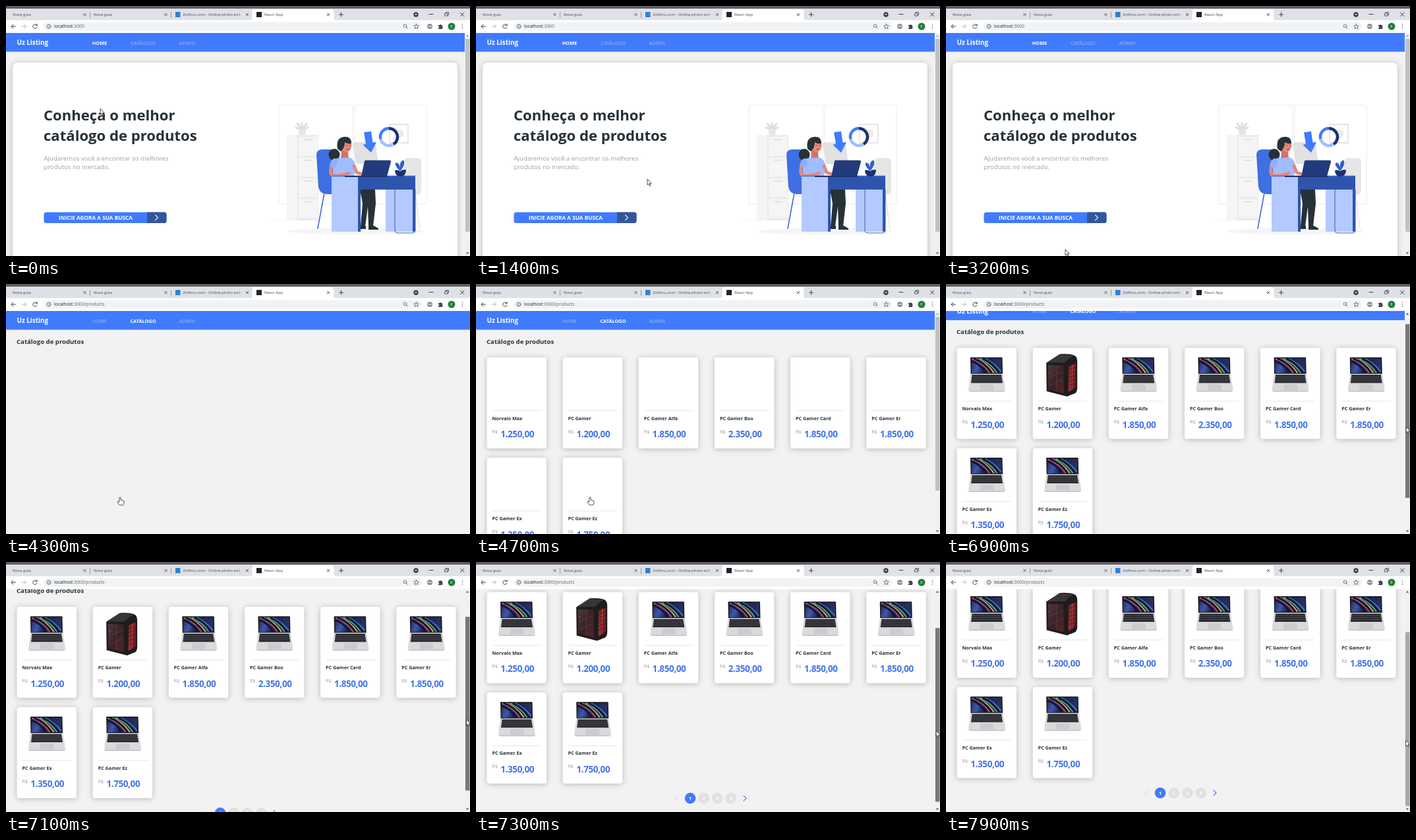
An HTML page that plays this animation: 704 by 380 pixels, repeating every 8000 ms.

```html
<!DOCTYPE html>
<html lang="pt">
<head>
<meta charset="utf-8">
<title>Catálogo</title>
<style>
html, body { margin: 0; width: 100%; height: 100%; overflow: hidden; background: #f2f2f2; }
svg { display: block; width: 704px; height: 380px; font-family: "Open Sans", sans-serif; }
.b { font-weight: 700; }
.mid { text-anchor: middle; }
.nav { font-size: 7.37px; text-anchor: middle; fill: #fff; fill-opacity: .5; }
.nav.on { font-weight: 700; fill-opacity: 1; }
.price { font-size: 13.5px; font-weight: 700; letter-spacing: -.03em; fill: #4474ec; }
.box { fill: #fff; filter: drop-shadow(0 1.5px 4px rgba(0,0,0,.25)); }
.line { fill: none; stroke-linecap: round; stroke-linejoin: round; }
</style>
</head>
<body>
<svg viewBox="0 0 704 380">
<defs>
  <linearGradient id="wallpaper" x1="0" x2="1" y2=".2">
    <stop offset="0" stop-color="#2a2440"/><stop offset=".3" stop-color="#3d58b0"/>
    <stop offset=".55" stop-color="#1d2350"/><stop offset="1" stop-color="#28305e"/>
  </linearGradient>
  <linearGradient id="glass" x2="1" y2="1">
    <stop offset="0" stop-color="#4c3a3d"/><stop offset=".5" stop-color="#3a2225"/><stop offset="1" stop-color="#54262b"/>
  </linearGradient>
  <linearGradient id="glow" x2="1" y2=".3">
    <stop offset="0" stop-color="#5a1c20"/><stop offset=".5" stop-color="#b8383c"/><stop offset="1" stop-color="#6c2226"/>
  </linearGradient>
  <linearGradient id="fade">
    <stop offset="0" stop-color="#dee1e6" stop-opacity="0"/><stop offset="1" stop-color="#dee1e6"/>
  </linearGradient>
  <g id="laptop">
    <path d="M20.500 15.500Q20.500 14.500 21.500 14.500H68Q69 14.500 69 15.500L69.500 40H21Z" fill="#15161b"/>
    <path d="M22 16H67.700L68 38.500H22.300Z" fill="url(#wallpaper)"/>
    <g class="line" style="stroke-linecap:butt" stroke-width="2">
      <path d="M23 17Q39 22 50 38" stroke="#c94f78"/>
      <path d="M29 16.500Q45 22 56 38" stroke="#e2b64b"/>
      <path d="M35 16.500Q51 23 61 38" stroke="#53a884"/>
      <path d="M43 16.500Q58 24 67 36" stroke="#3f78cf"/>
      <path d="M26 16.500Q42 22 53 38M39 16.500Q55 23 64 38M22.500 20Q36 25 44 38" stroke="#14162d" stroke-width="3"/>
    </g>
    <path d="M20.500 39.500H70L73.500 64Q73.500 66.500 71 66.500H20Q17.500 66.500 17.500 64Z" fill="#dadadd"/>
    <path d="M23 41H67.500L69.500 53.500H21.500Z" fill="#2b2c31"/>
    <path d="M23 44H68M22.500 47H68.500M22 50H69" stroke="#6d6f76" stroke-width=".6" stroke-dasharray="2.4 .9"/>
    <path d="M36 55.500H55L56.500 64.500H34.500Z" fill="#cbcbd0"/>
    <path d="M19 66H72" stroke="#a9a9ae" stroke-width=".8"/>
  </g>
  <g id="tower">
    <path d="M20.500 23 41 9.500Q55 8.500 63 11.500Q68 14 67.500 22V62Q67 69 62 70L52 74 21 66Z" fill="#1f1c1e"/>
    <path d="M21 22.500 41 10 63 12Q54 15 49 22.500Z" fill="#383638"/>
    <path d="M23 26 47 27V69L23.500 63Z" fill="url(#glass)"/>
    <path d="M25 45 45 36M25 58 45 48M36 27V66" stroke="#665054" stroke-width=".6"/>
    <circle cx="26" cy="38" r="1.2" fill="#a8343a"/>
    <path d="M54 29Q60 25 65 24V60Q60 64 54 67Z" fill="url(#glow)"/>
    <path d="M54 34 65 29M54 40 65 35M54 46 65 41M54 52 65 47M54 58 65 53M58 27V65M62 25V62" stroke="#47191c" stroke-width=".8"/>
  </g>
  <g id="chevron"><path class="line" d="M-2-4 2 0-2 4" stroke-width="1.1"/></g>
</defs>

<rect width="704" height="380" fill="#f2f2f2"/>

<g id="page">
  <rect y="41" width="704" height="28.500" fill="#407bff"/>
  <text class="b" x="16.500" y="59.200" font-size="9.85" fill="#fff">Uz Listing</text>
  <text id="navHome" class="nav" x="142" y="58.600">HOME</text>
  <text id="navCatalog" class="nav" x="208" y="58.600">CATÁLOGO</text>
  <text class="nav" x="275" y="58.600">ADMIN</text>

  <g id="home">
    <rect class="box" x="10" y="86" width="675" height="330" rx="7"/>
    <g class="b" font-size="22.1" fill="#263238">
      <text x="57" y="174">Conheça o melhor</text>
      <text x="57" y="205">catálogo de produtos</text>
    </g>
    <g font-size="9.6" fill="#9e9e9e">
      <text x="57.500" y="234.700">Ajudaremos você a encontrar os melhores</text>
      <text x="57.500" y="248.200">produtos no mercado.</text>
    </g>
    <rect x="57.500" y="313.500" width="186" height="16.500" rx="3.500" fill="#407bff"/>
    <path d="M214 313.500H240Q243.500 313.500 243.500 317V326.500Q243.500 330 240 330H214Z" fill="#33569b"/>
    <text class="b mid" x="136" y="324.800" font-size="8.25" fill="#fff">INICIE AGORA A SUA BUSCA</text>
    <use href="#chevron" x="228.500" y="321.700" stroke="#fff"/>

    <g id="illustration">
      <ellipse cx="531" cy="342.500" rx="103" ry="5" fill="#f5f5f5"/>
      <g fill="none" stroke="#e6e6e6" stroke-width=".8">
        <path d="M414 301V153Q414 151 416 151H526V301ZM529 301V151H636Q638 151 638 153V301Z"/>
        <path d="M402 326H434" stroke="#f0f0f0"/>
        <path d="M582 180H610V208H582Z" stroke="#dcdcdc" stroke-width="1.3"/>
        <circle cx="597" cy="194" r="6" fill="#ececec"/>
      </g>
      <path d="M426 196H442V326H426Z" fill="#f5f5f5"/>
      <path d="M442 196H474V326H442Z" fill="#ebebeb"/>
      <g id="drawers"></g>
      <path class="line" d="M449 188V178M449 187 442 179M449 187 456 179M446 186 440 185M452 186 458 185" stroke="#dedede" stroke-width="3.200"/>
      <path d="M443 187H456L454 196H445Z" fill="#e6e6e6"/>
      <path d="M604 236Q605 231 611 231H624Q630 231 630 238V281Q629 287 622 287H604Z" fill="#e6e6e6"/>
      <path d="M621 285 628 339M608 285 603 339" stroke="#e0e0e0" stroke-width="1.3"/>
      <path d="M526 211Q526 207 530 207H557Q560 207 561 211L565 240H531Z" fill="#e2e2e2"/>
      <path class="line" d="M483 284 473 338M506 284 516 338" stroke="#3a6be0" stroke-width="1.600"/>
      <path d="M471 225Q472 218 480 218H496Q503 219 505 228L511 279Q511 286 504 286H487Q476 286 474 275Z" fill="#3e6fe3"/>

      <g class="line" stroke-width="4.500" style="stroke-linecap:butt">
        <path d="M581 186A13 13 0 0 1 588 210" stroke="#1c3270"/>
        <path d="M588 210A13 13 0 0 1 568.300 202" stroke="#a0bdff"/>
        <path d="M568.300 202A13 13 0 0 1 581 186" stroke="#407bff"/>
      </g>
      <path d="M543 192 554 190.500 556.500 207.500 562 207 554 223 541.500 211 546 209.500Z" fill="#407bff"/>

      <path d="M537 279H560L561 300 557 335H550L549 305 545 335H538L541 300Z" fill="#263238"/>
      <path d="M538 334H546V339H535ZM550 334H558L565 338V340H550Z" fill="#263238"/>
      <path d="M509 218 519 221 520 233H508Z" fill="#d37466"/>
      <ellipse cx="517" cy="212" rx="7.500" ry="10" fill="#e4897b"/>
      <path d="M503 217Q500 201 512 199Q524 197 524 209Q518 210 514 207Q514 216 508 221Z" fill="#263238"/>
      <ellipse cx="498" cy="226" rx="8.500" ry="9" fill="#263238"/>
      <path class="line" d="M517 211.500V212.500M522 211V212M517 218Q520 219 521 217" stroke="#263238" stroke-width=".8"/>
      <path d="M496 236Q502 230 509 231L521 230Q530 233 531 247L527 260H496Z" fill="#a0bdff"/>
      <path class="line" d="M495 240Q490 253 495 257Q505 260 520 254M528 243 532 253 538 255" stroke="#e4897b" stroke-width="5"/>
      <path d="M493 236Q499 228 503 234L500 246 491 243Z" fill="#8eb0fb"/>

      <path d="M494 259H536V343H494Z" fill="#b3c9ff"/>
      <path d="M576 279H617V343H576Z" fill="#b3c9ff"/>
      <path d="M534 259H621V279H538V343H534ZM617 279H621V343H617Z" fill="#2e54ad"/>
      <path d="M494 258.500H621" stroke="#416fd1" stroke-width="1.300"/>
      <path d="M544 235.500Q544.500 234.500 546 234.500H582Q584.500 234.500 584 237L578 259H539Z" fill="#233b7c"/>
      <path d="M514 258H579V260H514Z" fill="#1c3270"/>
      <path d="M597 250Q588 241 592 238Q596 238 598 245Q597 236 603 234Q607 240 599 250Z" fill="#2e5fd0"/>
      <path d="M590 250Q594 248 598 251Q602 248 607 249Q607 256 602 259H595Q590 256 590 250Z" fill="#1c3270"/>
      <path class="line" d="M590 279V341Q590 345 594 345H617Q621 345 621 341V279" stroke="#2e54ad" stroke-width=".9"/>
    </g>
  </g>

  <g id="catalog">
    <text class="b" x="16" y="90.700" font-size="9.6" fill="#263238">Catálogo de produtos</text>
    <g id="products">
      <g id="cards"></g>
      <g id="pager" class="b mid" font-size="7"></g>
    </g>
  </g>
</g>

<g id="scrollbar">
  <path d="M696 41H704V380H696Z" fill="#f1f1f1"/>
  <path id="upArrow" d="M697.800 46.500 700 44 702.200 46.500Z"/>
  <path d="M697.800 374.500 700 377 702.200 374.500Z" fill="#505050"/>
  <rect id="thumb" x="697" width="6.500"/>
</g>

<g id="browser">
  <path d="M0 0H704V22H0Z" fill="#dee1e6"/>
  <path d="M0 0H704V4H0Z" fill="#625e64"/>
  <path d="M0 21.500H704V41H0Z" fill="#fff"/>
  <path d="M370 22Q373.500 22 373.500 18V8.500Q373.500 5 377 5H494Q497.500 5 497.500 8.500V18Q497.500 22 501 22Z" fill="#fff"/>
  <path d="M127.500 9V18M250.500 9V18" stroke="#85888d" stroke-width=".8"/>
  <g font-size="6" fill="#45484d">
    <text x="10" y="15.200">Nova guia</text>
    <text x="133" y="15.200">Nova guia</text>
    <text x="268.500" y="15.200">Zofimu.com - Online photo edit</text>
    <text x="392" y="15.200">React App</text>
  </g>
  <path d="M348 8H363V18H348Z" fill="url(#fade)"/>
  <rect x="257" y="9" width="7.500" height="8" fill="#2f7fd6"/>
  <rect x="380" y="9" width="8" height="8" fill="#20232a"/>
  <g id="closers" class="line" stroke="#4a4d52" stroke-width=".9"></g>
  <g class="line" stroke="#3c4043" stroke-width="1">
    <path d="M505.500 13H511.500M508.500 10V16M642 12.500H648M689.500 10 695 15.500M695 10 689.500 15.500"/>
    <path d="M666 11H670V15H666ZM667.500 11V9.500H671.500V13.500H670" stroke-width=".8"/>
    <path d="M14.500 31H8M11 28 8 31 11 34"/>
    <path d="M24 31H30.500M27.500 28 30.500 31 27.500 34" stroke="#b8babd"/>
    <path d="M46.500 29A3.200 3.200 0 1 0 47 32.200M47.200 27.500V29.700H45"/>
  </g>
  <circle cx="622" cy="13" r="3.700" fill="#3c4043"/>
  <path d="M620.300 12H623.700L622 14.200Z" fill="#fff"/>
  <rect x="57" y="24.500" width="574" height="13" rx="6.500" fill="#f1f3f4"/>
  <g class="line" stroke="#5f6368" stroke-width=".9">
    <circle cx="65" cy="31" r="3"/><path d="M65 30.800V32.500M65 29.300V29.400"/>
    <circle cx="605.500" cy="30.300" r="2.300"/><path d="M607.300 32.100 609.300 34"/>
    <path d="M622.500 27.300 623.600 29.700 626.300 30 624.300 31.800 624.900 34.400 622.500 33 620.100 34.400 620.700 31.800 618.700 30 621.400 29.700Z"/>
  </g>
  <text x="73" y="33.300" font-size="6.8" fill="#202124">localhost<tspan id="urlTail" fill="#5f6368"></tspan></text>
  <circle cx="643" cy="31" r="4" fill="#8c8f93"/>
  <path d="M640 31H646" stroke="#d5d7da" stroke-width="1.500"/>
  <path d="M656 29H658A1.300 1.300 0 0 1 660.500 29H662V31.200A1.300 1.300 0 0 1 662 33.600V35H656V33.500A1.200 1.200 0 0 0 656 31Z" fill="#46494d"/>
  <circle cx="676" cy="31" r="5.500" fill="#1e7e34"/>
  <text class="mid" x="676" y="33.200" font-size="6" fill="#fff">E</text>
  <path class="line" d="M692.500 28V28M692.500 31V31M692.500 34V34" stroke="#5f6368" stroke-width="1.500"/>
</g>

<g id="cursor" fill="#fff" stroke="#222" stroke-width=".8" stroke-linejoin="round">
  <path id="arrow" d="M0 0V9L2 7.200 3.500 10.500 5 9.900 3.500 6.700H6.300Z"/>
  <path id="hand" d="M-1.200.8Q0-.8 1.200.8V4.500Q2.300 3.600 3 5Q4.200 4.300 4.700 5.700Q6 5.300 6 6.800V9Q5.800 11 4.600 12H-.800Q-2.500 10-4 7.500Q-4 5.800-2.400 6.500L-1.200 7.500Z"/>
</g>
</svg>

<script>
const LOOP = 8000, STEP = 100;
const PAGE_CHANGE = 4200, PRODUCTS_IN = 4600, PHOTOS_IN = 5200;
const DRAG_START = 6800, DRAG_END = 7750, GRAB_Y = 206;
const MAX_SCROLL = 74, THUMB_RATIO = .766;
const $ = id => document.getElementById(id);
const show = (id, on) => $(id).setAttribute('display', on ? 'inline' : 'none');

const products = [
  ['Norvalo Max', '1.250,00'], ['PC Gamer', '1.200,00'], ['PC Gamer Alfa', '1.850,00'],
  ['PC Gamer Boo', '2.350,00'], ['PC Gamer Card', '1.850,00'], ['PC Gamer Er', '1.850,00'],
  ['PC Gamer Ex', '1.350,00'], ['PC Gamer Ez', '1.750,00']
];

$('cards').innerHTML = products.map(([name, price], i) => `
  <g transform="translate(${16.5 + i % 6 * 115.15} ${111.5 + Math.floor(i / 6) * 152.5})">
    <rect class="box" width="90.5" height="138.5" rx="4"/>
    <use class="photo" href="#${i === 1 ? 'tower' : 'laptop'}"/>
    <path d="M8.500 81H83" stroke="#e1e1e1" stroke-width=".8"/>
    <text class="b" x="8" y="95" font-size="7.2" fill="#263238">${name}</text>
    <text x="8" y="115.300" font-size="7.2" fill="#9e9e9e">R$</text>
    <text class="price" x="20.800" y="121.800">${price}</text>
  </g>`).join('');

$('pager').innerHTML = [1, 2, 3, 4].map(n => {
  const x = 304.5 + n * 20.6;
  return `<circle cx="${x}" cy="425" r="8.3" fill="${n === 1 ? '#407bff' : '#e1e1e1'}"/>
    <text x="${x}" y="427.5" fill="#fff">${n}</text>`;
}).join('') + `
  <use href="#chevron" transform="translate(304.5 425) scale(-1 1)" stroke="#e1e1e1"/>
  <use href="#chevron" x="408" y="425" stroke="#407bff"/>`;

$('drawers').innerHTML = [199, 230.5, 262, 293.5].map(y => `
  <rect x="444" y="${y}" width="29" height="29" fill="#f5f5f5"/>
  <path d="M452 ${y + 4}H465" stroke="#dcdcdc" stroke-width="1.500"/>`).join('');

$('closers').innerHTML = [119.5, 242.5, 366, 489].map(x =>
  `<path d="M${x - 1.8} 11.200l3.600 3.600m0-3.600l-3.600 3.600"/>`).join('');

// time, x, y of the pointer tip
const path = [
  [0, 143, 156], [900, 250, 235], [1400, 260, 263], [2000, 262, 285], [2700, 252, 318],
  [3200, 181, 370], [3600, 178, 366], [3900, 173, 324], [4900, 173, 324], [5500, 685, 220],
  [6100, 685, 220], [6500, 698, GRAB_Y], [DRAG_START, 698, GRAB_Y], [7100, 698.5, 239.3],
  [7400, 698, 265], [7700, 697.5, 271], [LOOP, 697.5, 271]
];

function pointerAt(t) {
  const i = path.findIndex(p => p[0] > t);
  const [t0, x0, y0] = path[i - 1], [t1, x1, y1] = path[i];
  const k = (t - t0) / (t1 - t0);
  return [x0 + (x1 - x0) * k, y0 + (y1 - y0) * k];
}

function draw(t) {
  const [x, y] = pointerAt(t);
  const onCatalog = t >= PAGE_CHANGE, loaded = t >= PRODUCTS_IN;
  const dragging = t >= DRAG_START && t < DRAG_END;
  const scroll = t < DRAG_START ? 0 : Math.min(MAX_SCROLL, (y - GRAB_Y) / THUMB_RATIO);

  show('home', !onCatalog);
  show('catalog', onCatalog);
  show('products', loaded);
  show('scrollbar', !onCatalog || loaded);
  document.querySelectorAll('.photo').forEach(p =>
    p.setAttribute('display', t >= PHOTOS_IN ? 'inline' : 'none'));
  $('navHome').classList.toggle('on', !onCatalog);
  $('navCatalog').classList.toggle('on', onCatalog);
  $('urlTail').textContent = onCatalog ? ':3000/products' : ':3000';

  $('page').setAttribute('transform', `translate(0 ${-scroll})`);
  const thumb = $('thumb');
  thumb.setAttribute('y', 50 + scroll * THUMB_RATIO);
  thumb.setAttribute('height', onCatalog ? 264 : 293);
  thumb.setAttribute('fill', dragging ? '#787878' : t >= 6400 ? '#a8a8a8' : '#c1c1c1');
  $('upArrow').setAttribute('fill', scroll ? '#505050' : '#a3a3a3');

  const overLink = t >= 3800 && t < 6200;
  show('hand', overLink);
  show('arrow', !overLink);
  $('cursor').setAttribute('transform', `translate(${x} ${y})`);
}

const start = performance.now();
function tick() {
  const t = (performance.now() - start) % LOOP;
  draw(Math.floor(t / STEP) * STEP);
  requestAnimationFrame(tick);
}
tick();
</script>
</body>
</html>
```
